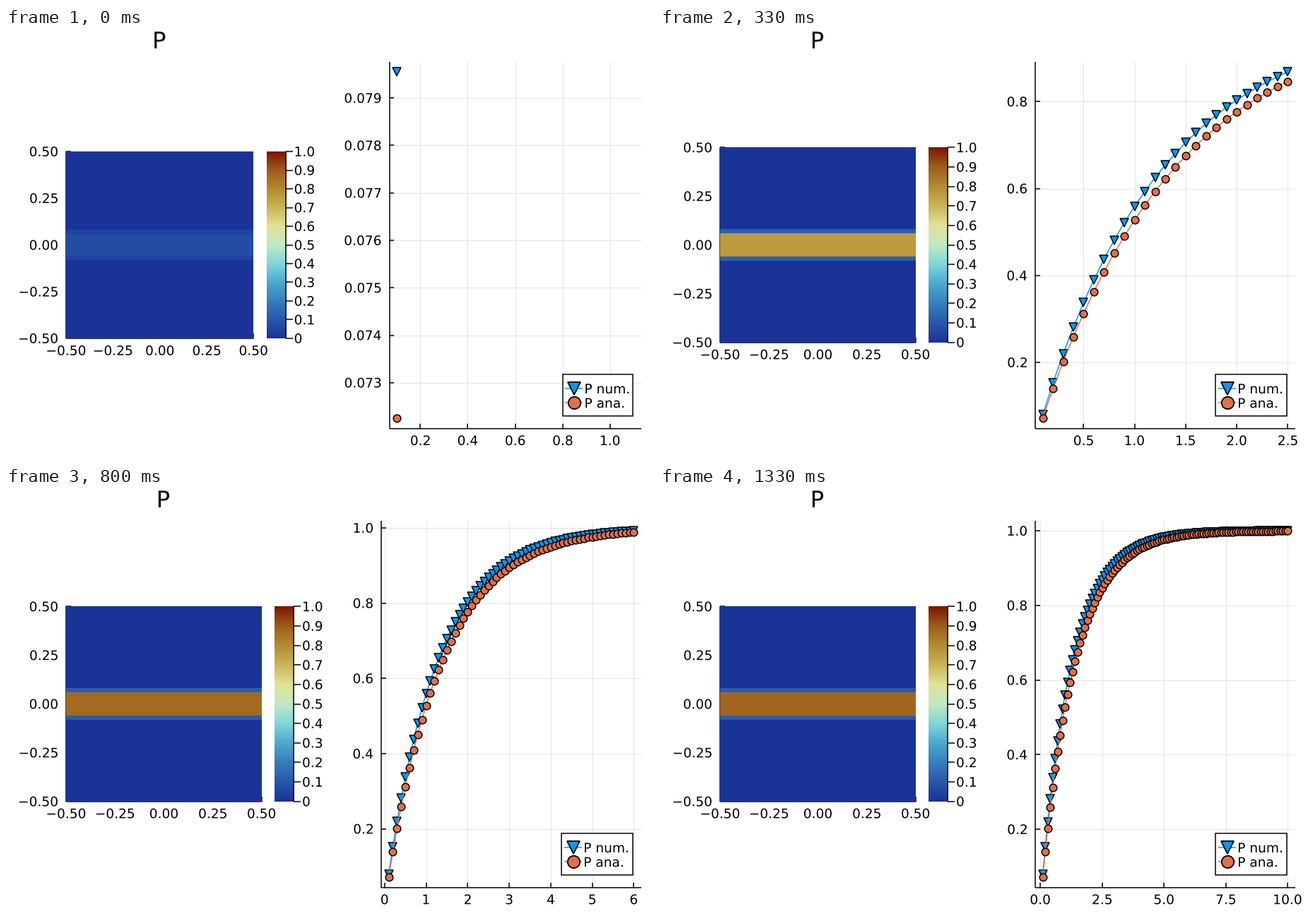
Animation of 917x611 px, one loop 1.39 s. Source, as a matplotlib script:

```python
import math

import numpy as np
import matplotlib.pyplot as plt
from matplotlib.animation import FuncAnimation
from matplotlib.colors import LinearSegmentedColormap
from matplotlib.patches import PathPatch, Rectangle
from matplotlib.textpath import TextPath
from matplotlib.transforms import Affine2D

W, H = 917, 611
STATES = 21
TICK_MS, LOOP_MS = 10, 1390

FONT = 18.6
LINE = 1.5
TICK = 6.5
BLUE, ORANGE = "#009AFA", "#E36F47"

# heat map, colour bar and plot geometry in pixels
HEAT_LEFT, HEAT_MID = 85.3, 307.5
TOP, BOTTOM, RIGHT = 47.5, 567.5, 898.8

CMAP = LinearSegmentedColormap.from_list("earth", [
    "#1A3399", "#2858AB", "#367FBD", "#4BAACF", "#80D6D8", "#C0EAC3",
    "#E1E398", "#CAB656", "#B48C30", "#9E5E1C", "#7E1700"], N=256)

plt.rcParams["font.family"] = "DejaVu Sans"
# 72 dpi makes one point equal one pixel
fig = plt.figure(figsize=(W / 72, H / 72), dpi=72, facecolor="white")
ax = fig.add_axes([0, 0, 1, 1])


def analytic(t):
    return 1 - np.exp(-0.75 * t)


def numeric(t):
    return 1 - np.exp(-0.8 * t - 0.0304 * (1 - np.exp(-t)))


def text(x, y, label, size=FONT, align="center"):
    """Place a label with its digits centred on height y."""
    path = TextPath((0, 0), label, size=size)
    box = path.get_extents()
    shift = {"left": 0, "right": box.x1, "center": (box.x0 + box.x1) / 2}[align]
    move = Affine2D().scale(1, -1).translate(x - shift, y + 0.365 * size)
    ax.add_patch(PathPatch(move.transform_path(path), fc="black", lw=0, zorder=9))


def line(x, y, color="black", width=LINE, z=3, **kw):
    ax.plot(x, y, color=color, lw=width, zorder=z, solid_capstyle="butt", **kw)


def rect(x0, y0, x1, y1, z, **kw):
    ax.add_patch(Rectangle((x0, y0), x1 - x0, y1 - y0, zorder=z, **kw))


def signed(v):
    return f"{v:.2f}".replace("-", "\u2212")


def ticks(lo, hi, step):
    first, last = math.ceil(lo / step), math.floor(hi / step)
    return [i * step for i in range(first, last + 1)]


def widen(lo, hi):
    pad = 0.03 * (hi - lo)
    return lo - pad, hi + pad


def x_step(k):
    if k == 1:
        return 0.1
    for last, step in ((3, 0.2), (6, 0.5), (13, 1), (19, 2)):
        if k <= last:
            return step
    return 2.5


def y_step(k):
    """Step and number of decimals on the vertical axis."""
    if k == 0:
        return 0.001, 3
    if k == 1:
        return 0.05, 2
    return (0.1 if k <= 3 else 0.2), 1


def draw_heat(right, t):
    half = (right - HEAT_LEFT) / 2
    mid = HEAT_LEFT + half
    top, bottom = HEAT_MID - half, HEAT_MID + half

    line([HEAT_LEFT, HEAT_LEFT], [top, bottom], z=1)
    line([HEAT_LEFT, right], [bottom, bottom], z=1)
    line([HEAT_LEFT, HEAT_LEFT + TICK], [top, top], z=1)
    line([right, right], [bottom, bottom - TICK], z=1)

    core = 0.88 * numeric(t)
    edge = 0.11 * (1 - math.exp(-5 * t)) + 0.03 * t * math.exp(-t / 1.5)
    for reach, value in ((0.5, 0), (0.08, edge), (0.06, core)):
        dy = reach * 2 * half
        rect(HEAT_LEFT, HEAT_MID - dy, right, HEAT_MID + dy, 2,
             fc=CMAP(float(value)), lw=0)

    for v in np.linspace(-0.5, 0.5, 5):
        text(HEAT_LEFT - 12.5, HEAT_MID - v * 2 * half, signed(v), align="right")
        text(mid + v * 2 * half, bottom + 17, signed(v))
    text(mid, 17, "P", size=32.3)

    x0, x1 = right + 18.6, right + 45.8
    ax.imshow(np.linspace(1, 0, 256)[:, None], cmap=CMAP, aspect="auto",
              extent=(x0, x1, bottom, top), zorder=2)
    line([x1, x1], [top, bottom])
    for i in range(11):
        y = bottom - i / 10 * 2 * half
        line([x1, x1 + 10], [y, y])
        text(x1 + 11.6, y, f"{i / 10:.1f}" if i else "0", align="left")


def draw_curves(left, k, t):
    num, ana = numeric(t), analytic(t)
    xlo, xhi = widen(t[0], t[-1] if k else t[0] + 1)
    ylo, yhi = widen(ana[0], num[-1])

    def px(x):
        return left + (x - xlo) / (xhi - xlo) * (RIGHT - left)

    def py(y):
        return BOTTOM - (y - ylo) / (yhi - ylo) * (BOTTOM - TOP)

    step = x_step(k)
    for v in ticks(xlo, xhi, step):
        x = px(v)
        line([x, x], [TOP, BOTTOM], width=1, z=1, alpha=0.1)
        line([x, x], [BOTTOM, BOTTOM - TICK])
        text(x, 584.5, f"{v:.{0 if step in (1, 2) else 1}f}")

    step, places = y_step(k)
    for v in ticks(ylo, yhi, step):
        y = py(v)
        line([left, RIGHT], [y, y], width=1, z=1, alpha=0.1)
        line([left, left + TICK], [y, y])
        text(left - 12.3, y, f"{v:.{places}f}", align="right")

    line([left, left], [TOP, BOTTOM])
    line([left, RIGHT], [BOTTOM, BOTTOM])

    style = dict(mec="black", mew=LINE)
    line(px(t), py(num), BLUE, z=4, marker="v", ms=11.2,
         markeredgewidth=LINE, markeredgecolor="black")
    line(px(t), py(ana), ORANGE, z=5, marker="o", ms=10.6, **style)


def draw_legend(shift):
    x = 802.6 + shift
    rect(786.3 + shift, 490.5, 887, 550, 6, fc="white", ec="black", lw=LINE)
    rows = ((510.7, BLUE, "v", 18.8, "P num."), (531, ORANGE, "o", 17.4, "P ana."))
    for y, color, marker, size, label in rows:
        line([x - 12.5, x + 12.5], [y, y], color, z=7)
        line([x], [y], color, z=8, marker=marker, ms=size, mec="black", mew=1.8)
        text(x + 14.6, y + 0.5, label, align="left")


def draw(k):
    ax.clear()
    ax.set(xlim=(0, W), ylim=(H, 0))
    ax.axis("off")
    # longer tick labels narrow both panels
    pad = 5.7 * (y_step(k)[1] - 1)
    t = np.arange(1, max(1, 5 * k) + 1) / 10
    draw_heat(361.6 - pad, t[-1])
    draw_curves(531.2 + pad, k, t)
    draw_legend(pad / 9)


shown = None


def update(i):
    global shown
    k = min(int((i + 0.5) * 3 / 20), STATES - 1)
    if k != shown:
        draw(k)
        shown = k
    return []


anim = FuncAnimation(fig, update, frames=LOOP_MS // TICK_MS, interval=TICK_MS,
                     repeat=True, repeat_delay=0, blit=False)
plt.show()
```
